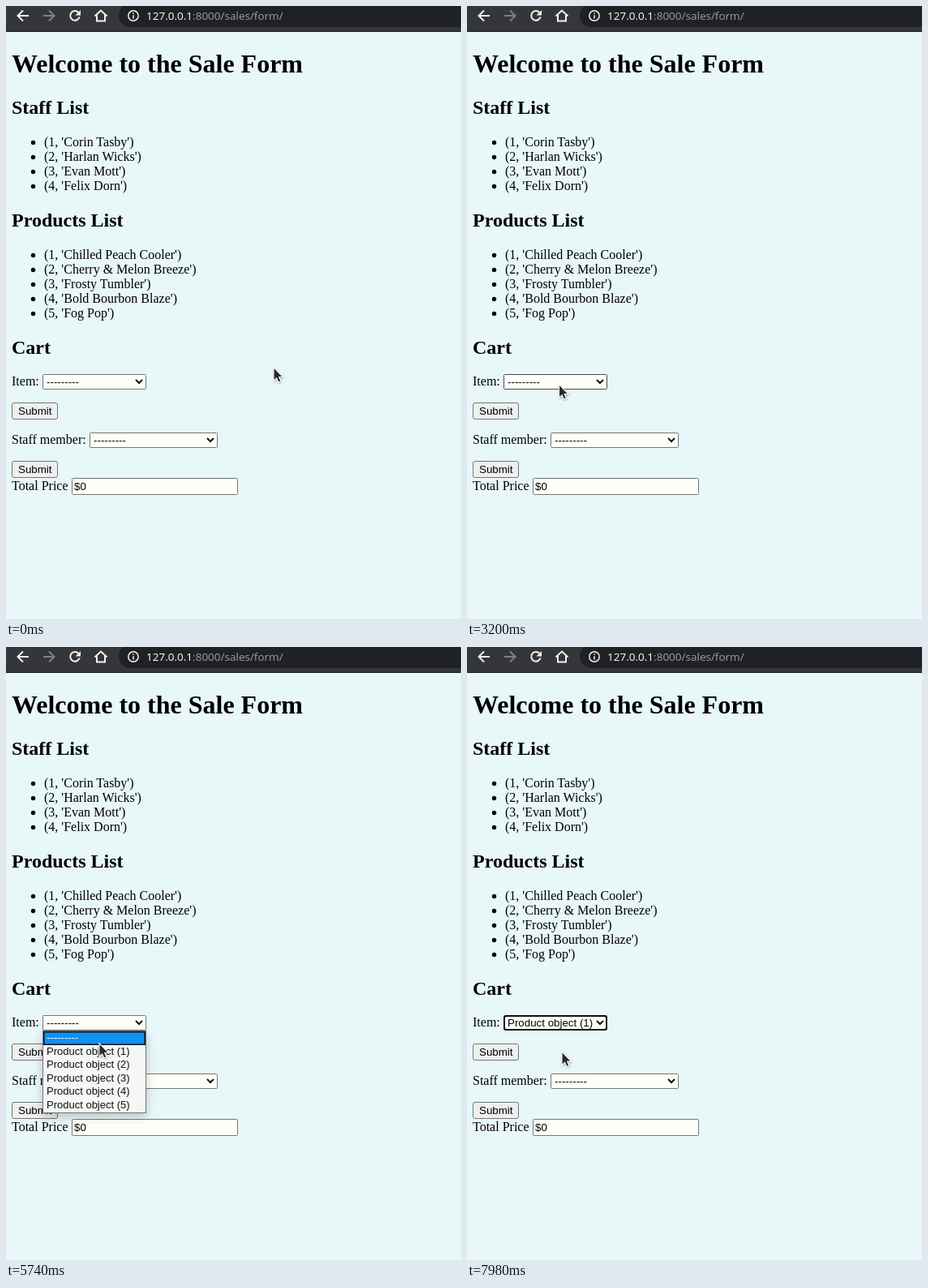
An HTML page that plays this animation: 561 by 756 pixels, repeating every 8 s.

```html
<!DOCTYPE html>
<html lang="en">
<head>
<meta charset="utf-8">
<title>Sale Form</title>
<style>
html, body { margin: 0; width: 100%; height: 100%; overflow: hidden; background: #e8f7f8; }
svg { display: block; width: 100%; height: 100%; }
text { font: 16px "Liberation Serif", serif; white-space: pre; }
.h1 { font-size: 32px; font-weight: bold; }
.h2 { font-size: 24px; font-weight: bold; }
.ui { font: 13.333px "Liberation Sans", sans-serif; }
.option { font: 13px "Liberation Sans", sans-serif; }
.bar { font: 13.5px "Open Sans", "Noto Sans", sans-serif; fill: #fff; }
.field { fill: #fffffa; stroke: #767676; }
.button { fill: #efefef; stroke: #767676; }
.icon { fill: none; stroke: #f1f1f1; stroke-width: 2; }
</style>
</head>
<body>
<svg viewBox="0 0 561 756">
  <defs>
    <filter id="shadow" x="-30%" y="-50%" width="160%" height="200%">
      <feDropShadow dx="0" dy="4" stdDeviation="6" flood-opacity=".22"/>
    </filter>
    <filter id="soft" x="-50%" y="-50%" width="200%" height="200%">
      <feDropShadow dx=".5" dy="1" stdDeviation=".8" flood-opacity=".4"/>
    </filter>
  </defs>
  <rect width="561" height="756" fill="#e8f7f8"/>

  <g id="toolbar">
    <rect width="561" height="31" fill="#35363a"/>
    <rect y="31" width="561" height="1" fill="#1d1e20"/>
    <rect x="139" y="-3" width="460" height="29" rx="14.5" fill="#202124"/>
    <path class="icon" d="M28 12H15M21 5.5L14.5 12L21 18.5"/>
    <path class="icon" d="M46 12H59M53 5.5L59.5 12L53 18.5" style="stroke:#808184"/>
    <path class="icon" d="M89.3 8A5.8 5.8 0 1 0 90.6 13.5"/>
    <path d="M92 5V11.5H85.5Z" fill="#f1f1f1"/>
    <path class="icon" d="M109.5 12.5L117 5.5L124.5 12.5M112 11V18.5H122V11"/>
    <circle class="icon" cx="157" cy="12" r="6.2" style="stroke-width:1.5"/>
    <path class="icon" d="M157 11.2V15.5M157 8.3V9.8" style="stroke-width:1.5"/>
    <text class="bar" x="173" y="17">127.0.0.1<tspan fill="#9aa0a6">:8000/sales/form/</tspan></text>
  </g>

  <g id="page"></g>
  <rect id="ring" x="46" y="455" width="126" height="17" rx="2.5" fill="none" stroke="#101010" stroke-width="2"/>

  <g id="popup">
    <rect x="45.5" y="473.5" width="127" height="101" fill="#f5f7f4" stroke="#767676" filter="url(#shadow)"/>
    <rect id="mark" x="46.75" width="124.5" height="15.5" fill="#1090f0" stroke="#101018" stroke-width="1.5"/>
    <g id="options"></g>
  </g>

  <g id="tip">
    <rect x="123" y="482" width="224" height="25" rx="3" fill="#2b2b2b" filter="url(#shadow)"/>
    <text class="bar" x="131" y="499">Please select an item in the list.</text>
  </g>

  <path id="cursor" d="M.5 1V15L3.8 12L6.2 17.3L8.2 16.4L5.9 11H10.2Z" fill="#2b2b2b" stroke="#fff" stroke-width="2" paint-order="stroke" filter="url(#soft)"/>
</svg>
<script>
const $ = id => document.getElementById(id);

function add(parent, tag, attrs, content = "") {
  const el = document.createElementNS("http://www.w3.org/2000/svg", tag);
  for (const k in attrs) el.setAttribute(k, attrs[k]);
  el.textContent = content;
  return parent.appendChild(el);
}

const page = $("page");
const label = (s, x, y, cls = "") => add(page, "text", { x, y, class: cls }, s);
const box = (x, y, w, h, rx, cls) =>
  add(page, "rect", { x: x + .5, y: y + .5, width: w - 1, height: h - 1, rx, class: cls });

function list(title, y, names) {
  label(title, 7, y, "h2");
  names.forEach((name, i) => {
    const base = y + 40 + i * 18;
    add(page, "circle", { cx: 33.5, cy: base - 4.5, r: 2.7 });
    label(`(${i + 1}, '${name}')`, 47, base);
  });
}

function select(x, y, w) {
  const frame = box(x, y, w, 19, 1, "field");
  const value = label("---------", x + 5, y + 14, "ui");
  add(page, "path", {
    d: `M${x + w - 13} ${y + 7}l4 4 4-4`, fill: "none", stroke: "#111", "stroke-width": 2
  });
  return { frame, value };
}

function submit(y) {
  box(7, y, 57, 21, 2.5, "button");
  label("Submit", 15, y + 15, "ui");
}

label("Welcome to the Sale Form", 7, 82, "h1");
list("Staff List", 133, ["Corin Tasby", "Harlan Wicks", "Evan Mott", "Felix Dorn"]);
list("Products List", 272, ["Chilled Peach Cooler", "Cherry & Melon Breeze",
  "Frosty Tumbler", "Bold Bourbon Blaze", "Fog Pop"]);
label("Cart", 7, 429, "h2");
label("Item:", 7, 468);
const item = select(45, 454, 128);
submit(489);
label("Staff member:", 7, 540);
select(103, 526, 158);
submit(561);
label("Total Price", 7, 597);
box(81, 582, 205, 21, 1, "field");
label("$0", 84, 597, "ui");

const rowTop = i => 474 + Math.round(i * 16.6);
const options = [..."012345"].map((n, i) =>
  add($("options"), "text", { x: 50, y: rowTop(i) + 12, class: "option" },
    i ? `Product object (${n})` : "---------"));

// Pointer positions: start time, x, y
const path = [
  [0, 330, 446], [840, 322, 448], [1140, 291, 452], [1420, 265.5, 456],
  [1800, 213, 460], [2080, 188, 462], [2240, 168, 462], [2360, 153, 461],
  [2640, 137, 462], [2920, 126, 464], [3200, 113.5, 467], [5740, 115, 489],
  [5860, 126, 500], [6020, 116, 491], [6300, 121.5, 503], [7980, 117, 499.5]
];

const show = (el, on) => el.setAttribute("opacity", +on);

function draw(t) {
  const [, x, y] = path.findLast(p => p[0] <= t);
  $("cursor").setAttribute("transform", `translate(${x} ${y})`);

  const chosen = t >= 7400;
  const row = t >= 5860 ? 1 : 0;
  item.frame.style.stroke = t >= 2240 && t < 4060 ? "#4a4a4a" : "#767676";
  item.value.textContent = options[chosen ? 1 : 0].textContent;
  show($("ring"), chosen);
  show($("popup"), t >= 4060 && !chosen);
  show($("tip"), t < 3640 || t >= 3940 ? 0 : t < 3760 ? .5 : 1);
  $("mark").setAttribute("y", rowTop(row) + .75);
  options.forEach((el, i) => el.setAttribute("fill", i === row ? "#fff" : "#111"));
}

function tick() {
  draw(performance.now() % 8000);
  requestAnimationFrame(tick);
}
tick();
</script>
</body>
</html>
```
